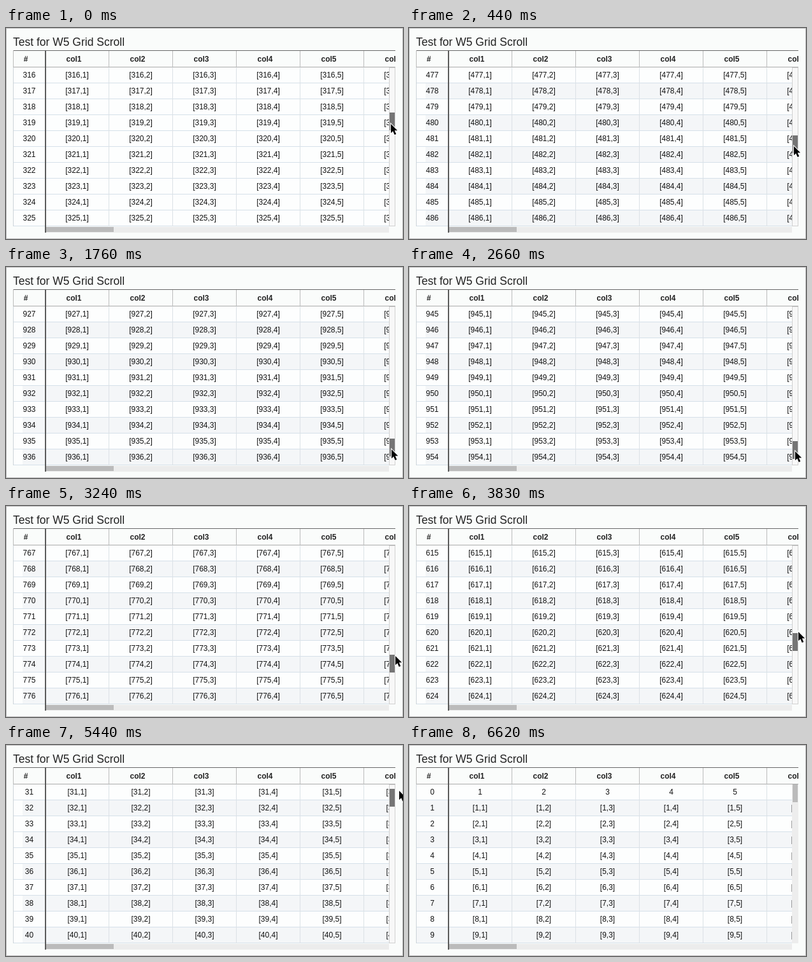
An HTML page that plays this animation: 623x332 px, repeating every 7.51 s.

```html
<!DOCTYPE html>
<html lang="en">
<head>
<meta charset="utf-8">
<title>Grid scroll</title>
<style>
  html, body { margin: 0; width: 100%; height: 100%; overflow: hidden; background: #fafcfb; }
  svg { display: block; }
  text { font: 12px "Liberation Sans", Arial, sans-serif; fill: #111; text-anchor: middle; }
  .title { font-size: 17.5px; fill: #222; text-anchor: start; }
  .head { font-weight: bold; fill: #222; }
</style>
</head>
<body>
<svg id="stage" width="623" height="332">
  <clipPath id="headClip"><rect x="11" y="35" width="600" height="27"/></clipPath>
  <clipPath id="bodyClip"><rect x="11" y="62" width="590" height="250"/></clipPath>
  <rect x=".5" y=".5" width="622" height="331" fill="none" stroke="#bbb"/>
  <text class="title" x="11" y="28">Test for W5 Grid Scroll</text>
  <g id="head" clip-path="url(#headClip)"></g>
  <g id="body" clip-path="url(#bodyClip)"></g>
  <g id="bars"></g>
  <path id="cursor" d="M0 0V14.2L3.2 11.2L5.7 17L8.3 15.9L5.8 10.3H10.2Z"
        fill="#000" stroke="#fff" paint-order="stroke" stroke-width="2"/>
</svg>
<script>
const LOOP = 7510, TICK = 147, ROWS = 10, COLS = 6, ROW_H = 25, TOP = 62;
const MAX_ROW = 990, TRAVEL = 222;
const $ = id => document.getElementById(id);

function add(parent, tag, attrs, content = "") {
  const el = document.createElementNS("http://www.w3.org/2000/svg", tag);
  for (const k in attrs) el.setAttribute(k, attrs[k]);
  el.textContent = content;
  return parent.appendChild(el);
}
const rect = (parent, x, y, width, height, fill) =>
  add(parent, "rect", { x, y, width, height, fill });
const label = (parent, x, y, content, cls = "") =>
  add(parent, "text", { x, y, class: cls }, content);

// Header
const head = $("head"), body = $("body"), bars = $("bars");
rect(head, 11, 35, 600, 1, "#666");
rect(head, 11, 61, 600, 1, "#aaa");
rect(head, 11, 35, 1, 27, "#bbb");
label(head, 31, 53, "#", "head");
for (let c = 1; c <= COLS; c++) {
  label(head, 6.5 + c * 100, 53, "col" + c, "head");
  rect(head, 61 + c * 100, 36, 1, 26, "#bbb");
}

// Body
rect(body, 12, TOP, 589, 250, "#fdfefe");
const stripes = [], cells = [];
for (let r = 0; r < ROWS; r++) {
  const y = TOP + r * ROW_H;
  if (r % 2) stripes.push(rect(body, 12, y, 589, ROW_H, "#f4f6f8"));
  rect(body, 11, y + 24, 590, 1, "#d5e0e9");
}
for (let c = 1; c < COLS; c++) rect(body, 61 + c * 100, TOP, 1, 250, "#dbe1e6");
rect(body, 11, TOP, 1, 250, "#ccd3d8");
for (let r = 0; r < ROWS; r++)
  cells.push(Array.from({ length: COLS + 1 }, (_, c) =>
    label(body, c ? 11.5 + c * 100 : 36.5, 78 + r * ROW_H, "")));

// Scrollbars and the fixed column's edge
rect(bars, 62, 313, 539, 9, "#ececec");
rect(bars, 62, 313, 107, 8, "#bbb");
rect(bars, 61, 36, 2, 286, "#5a5a5a");
const track = rect(bars, 601.5, 62.5, 9, 249, "#eee");
const thumb = rect(bars, 602, TOP, 8, 28, "#777");

// Piecewise linear value of [tick, value] pairs
function along(keys, n) {
  const i = keys.findIndex(k => k[0] > n);
  if (i < 0) return keys[keys.length - 1][1];
  if (!i) return keys[0][1];
  const [a, u] = keys[i - 1], [b, v] = keys[i];
  return u + (v - u) * (n - a) / (b - a);
}
const scroll = [[0, 71], [7, 155], [12, 208], [14, 222], [17, 222], [22, 172],
  [29, 112], [30, 112], [31, 104], [37, 7], [38, 0]];
const cursorX = [[0, 604], [7, 605], [17, 605], [22, 611], [31, 611], [37, 617],
  [41, 617], [43, 626]];
const cursorY = [[0, 151], [7, 233], [12, 287], [14, 304], [17, 304], [22, 236],
  [29, 170], [30, 170], [31, 163], [37, 72], [38, 69], [40, 66]];
const grey = v => `rgb(${v},${v},${v})`;

let shown = -1;
function draw(n) {
  const pos = Math.round(along(scroll, n));
  const first = Math.floor(pos * MAX_ROW / TRAVEL);
  cells.forEach((row, r) => row.forEach((cell, c) => {
    const id = first + r;
    cell.textContent = !c ? id : id ? `[${id},${c}]` : c;
  }));

  // The striping starts with the first scroll step
  const left = n < 42 ? 26 : 12;
  stripes.forEach(s => {
    s.setAttribute("x", left);
    s.setAttribute("width", 601 - left);
    s.setAttribute("visibility", n ? "visible" : "hidden");
  });

  const idle = along([[41, 0], [45, 1]], n);
  const mix = (a, b) => grey(Math.round(a + (b - a) * idle));
  track.setAttribute("fill", mix(248, 237));
  track.setAttribute("stroke", mix(208, 237));
  thumb.setAttribute("fill", mix(117, 187));
  thumb.setAttribute("y", TOP + pos);
  $("cursor").setAttribute("transform",
    `translate(${Math.round(along(cursorX, n))} ${Math.round(along(cursorY, n))})`);
}

const start = performance.now();
function frame() {
  const t = (performance.now() - start) % LOOP;
  const n = Math.min(50, Math.floor((t + 7) / TICK));
  if (n !== shown) draw(shown = n);
  requestAnimationFrame(frame);
}
frame();
</script>
</body>
</html>
```
